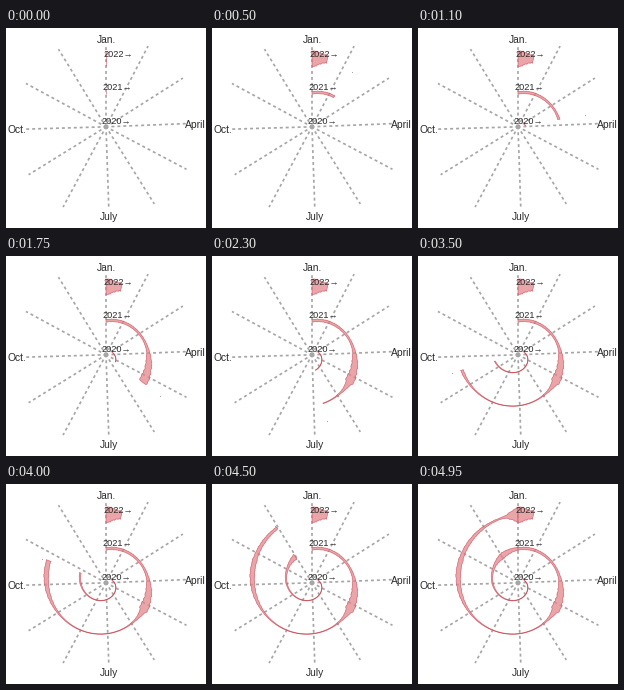
A matplotlib script that plays this animation: 200x200 px, repeating every 5000 ms.

```python
import numpy as np
import matplotlib.pyplot as plt
from matplotlib.animation import FuncAnimation

SIZE, DPI, FRAMES = 200, 100, 100
PX = 72 / DPI
CX, CY = 100, 98.8
GAP = 34          # radial distance between two turns
DAYS = 366
FIRST_DAYS = (73, 0, 0)
LAST_DAYS = (DAYS, DAYS, 13)
FILL, EDGE, GRAY = (0.89, 0.53, 0.55, 0.75), "#cf5b67", "#a6a6a6"

# waves of cases: peak time in years, spread, half width
WAVES = [
    (0.92, 0.035, 1.6), (1.00, 0.17, 1.0), (1.31, 0.045, 3.0),
    (1.345, 0.015, 1.6), (1.78, 0.07, 2.0), (1.90, 0.04, 0.5),
    (2.00, 0.014, 5.2), (2.03, 0.03, 3.4),
]


def polar(angle, radius):
    return CX + radius * np.sin(angle), CY - radius * np.cos(angle)


def half_widths(year):
    day = np.arange(LAST_DAYS[year] + 1)
    time = year + day / DAYS
    width = 0.25 + sum(height * np.exp(-((time - peak) / spread) ** 2 / 2)
                       for peak, spread, height in WAVES)
    rng = np.random.default_rng(year + 4)
    weekly = 0.06 * np.sin(2 * np.pi * day / 7)
    return width * (1 + weekly + rng.uniform(-0.13, 0.13, day.size))


def ribbon(year, last):
    day = np.arange(FIRST_DAYS[year], last + 1)
    angle = 2 * np.pi * day / DAYS
    radius = GAP * (year + day / DAYS)
    half = widths[year][day]
    outer = np.column_stack(polar(angle, radius + half))
    inner = np.column_stack(polar(angle, radius - half))
    return np.vstack([outer, inner[::-1]])


fig = plt.figure(figsize=(SIZE / DPI, SIZE / DPI), dpi=DPI, facecolor="white")
ax = fig.add_axes([0, 0, 1, 1])
ax.set_xlim(0, SIZE)
ax.set_ylim(SIZE, 0)
ax.axis("off")

# month spokes, shorter where a label stands at the end
for month in range(12):
    start = max(0, 30.6 * month - 2.6)
    length = 91 if month % 3 else 81
    x, y = polar(2 * np.pi * start / DAYS, length)
    ax.plot([CX, x], [CY, y], color=GRAY, lw=1.7 * PX,
            ls=(0.3, (1.75, 1.75)), dash_capstyle="butt", zorder=1)

# ribbons, one for each year
widths = [half_widths(year) for year in range(3)]
bands = []
for year in range(3):
    band = plt.Polygon([(CX, CY)] * 3, closed=True, fc=FILL, ec=EDGE,
                       lw=0.6 * PX, joinstyle="round", zorder=2)
    bands.append(ax.add_patch(band))
dot, = ax.plot([], [], "o", ms=1.1 * PX, color="#999999", mew=0, zorder=2)


def label(x, y, text, size=10.3, align="left"):
    ax.text(x, y, text, family="Liberation Sans", fontsize=size * PX,
            color="#2b2b2b", ha=align, va="baseline", zorder=3)


label(100.3, 14.7, "Jan.", align="center")
label(178.7, 99.5, "April")
label(103, 192, "July", align="center")
label(2, 105.3, "Oct.")
for year in range(3):
    label(95.6 + 1.1 * year, 95.8 - 33.3 * year, f"{2020 + year}→", size=9.2)


def draw(frame):
    progress = frame / (FRAMES - 1)
    today = round(progress * DAYS)
    for year, band in enumerate(bands):
        last = min(today, LAST_DAYS[year])
        started = last >= FIRST_DAYS[year]
        band.set_visible(started)
        if started:
            band.set_xy(ribbon(year, last))
    # the last year has no data past mid January
    x, y = polar(2 * np.pi * progress, 2 * GAP)
    dot.set_data([x], [y])
    dot.set_visible(today > LAST_DAYS[-1])
    return [*bands, dot]


anim = FuncAnimation(fig, draw, frames=FRAMES, interval=50,
                     repeat=True, repeat_delay=0, blit=False)
plt.show()
```
